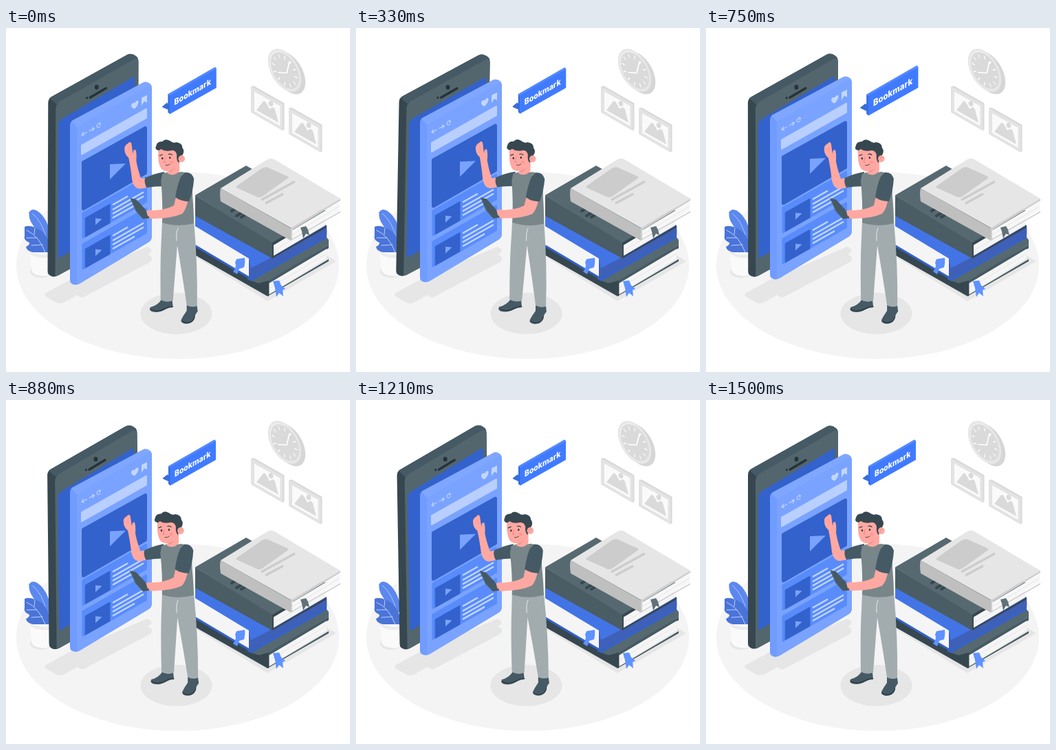
These frames come from a looping animation (500x500 px, 1.54 s). An HTML page with a canvas:

```html
<!DOCTYPE html>
<html lang="en">
<head>
<meta charset="utf-8">
<title>Bookmark</title>
<style>
html, body { margin: 0; width: 100%; height: 100%; overflow: hidden; background: #fff; }
canvas { display: block; width: 500px; height: 500px; }
</style>
</head>
<body>
<canvas id="stage"></canvas>
<script>
const LOOP = 1540;
const LEAD = 40;
const BLUE = '#407bff', DEEP = '#3362cc', PALE = '#79a3ff', MIST = '#c3d6ff', RIBBON = '#5f92ff';
const INK = '#263238', SLATE = '#37474f', STEEL = '#455a64', SKIN = '#ffa8a2';

const canvas = document.getElementById('stage');
const ctx = canvas.getContext('2d');
const ratio = window.devicePixelRatio || 1;
canvas.width = canvas.height = 500 * ratio;

const fill = (color, d) => {
  ctx.fillStyle = color;
  ctx.fill(new Path2D(d));
};

const stroke = (color, width, d, cap = 'round') => {
  ctx.strokeStyle = color;
  ctx.lineWidth = width;
  ctx.lineCap = cap;
  ctx.lineJoin = 'round';
  ctx.stroke(new Path2D(d));
};

const oval = (color, x, y, rx, ry = rx, turn = 0) => {
  ctx.fillStyle = color;
  ctx.beginPath();
  ctx.ellipse(x, y, rx, ry, turn, 0, Math.PI * 2);
  ctx.fill();
};

const rounded = (color, join, d) => {
  fill(color, d);
  stroke(color, join, d);
};

const group = (transform, draw) => {
  ctx.save();
  transform();
  draw();
  ctx.restore();
};

const rotateAbout = (x, y, angle) => {
  ctx.translate(x, y);
  ctx.rotate(angle);
  ctx.translate(-x, -y);
};

const scaleAbout = (x, y, size) => {
  ctx.translate(x, y);
  ctx.scale(size, size);
  ctx.translate(-x, -y);
};

function drawFloor() {
  oval('#f4f4f4', 249.5, 345, 234.5, 136);
  oval('#e6e6e6', 247.5, 415, 52, 30);
  fill('#e6e6e6', 'M58 385L93 366 205 318Q213 320 211 326L206 329 211 332Q214 337 208 341L113 391Q109 393 104 388L86 398Q79 402 73 399L59 391Q54 388 58 385Z');
  fill('#e6e6e6', 'M276 333L380 397 480 339 465 330Z');
}

function drawClock() {
  const disc = (color, x, y, r) => group(() => ctx.transform(.866, .5, 0, 1, x, y), () => oval(color, 0, 0, r));
  disc('#d6d6d6', 411, 65, 28);
  disc('#e6e6e6', 405, 61.5, 28);
  disc('#f0f0f0', 405, 61.5, 25);
  disc('#dadada', 405.5, 62, 24);
  group(() => ctx.transform(.866, .5, 0, 1, 405, 62), () => {
    for (let i = 0; i < 12; i++) {
      ctx.rotate(Math.PI / 6);
      stroke('#fff', 1.4, 'M0 -21V-17');
    }
  });
  stroke('#fff', 1.7, 'M396 64.5L408 65.5 412 49');
}

function drawPicture(x, y) {
  group(() => ctx.translate(x, y), () => {
    rounded('#d9d9d9', 1, 'M0 0L3 -1 47 24V62L45 63 0 37Z');
    rounded('#e3e3e3', 1, 'M0 0L45 25.5V63L0 37Z');
    fill('#fafafa', 'M4 7L41.500 28V57L4 35.500Z');
    fill('#dadada', 'M7 34L17 21Q19 20 21 23L26 32 30 30Q32 29 34 33L39 52Z');
    oval('#dadada', 28, 24.5, 3.3, 4, -.3);
  });
}

function drawBooks() {
  // Lowest book
  fill(STEEL, 'M275 316L382 365 469 315V320L383 371V387L469 336V339L380 390 275 330Z');
  fill(SLATE, 'M275 318L382 367V390L275 330Z');
  fill('#f5f5f5', 'M382.500 371L466 321V335L382.500 387Z');
  stroke('#e0e0e0', .7, 'M383 378L466 328');
  fill('#566970', 'M350 365L465 303 469 308V315L382 367 367 371Z');
  fill(RIBBON, 'M388 368L397 367 400 374 406 379 402 381 403 390 397 385 393 391 391 378Z');

  // Blue book
  fill('#3f60b8', 'M353 327L465 286Q467 287 466 304L356 368Q351 366 353 327Z');
  fill('#f5f5f5', 'M275 285L353 332V362L275 317Z');
  fill('#4374e6', 'M275 268L387 333 356 349 353 335 275 288Z');
  stroke(DEEP, 3, 'M275 316.500L352 362Q354 367 358 365L465 304', 'butt');
  fill(RIBBON, 'M335 336L347 334Q348 340 346 348L339 350 336 358 330 354Q336 347 333 341Z');

  // Dark book
  fill('#566970', 'M275 243L349 200 467 267 387 313Z');
  fill('#4a5c64', 'M275 243L387 312V335L275 273Z');
  fill(SLATE, 'M387 312L465 267V271L390 315V331L466 287V290L387 335Z');
  fill('#f5f5f5', 'M389 315.500L464 272V287L389 331Z');
  stroke('#e0e0e0', .7, 'M390 323L464 280');
  stroke(SLATE, 4, 'M328 266L338 260M335 273L347 266M342 275L350 270');

  // Light book
  fill('#bfbfbf', 'M312 233Q310 239 312 252L414 309V291Z');
  fill('#e6e6e6', 'M312 233L380 191Q385 188 390 191L486 248 415 291Z');
  fill('#cfcfcf', 'M414 291L486 248V251L417 293V306L486 266V268L414 309Z');
  fill('#f7f7f7', 'M416 294L485 253V265L416 306Z');
  stroke('#dedede', .7, 'M417 300L485 259');
  rounded('#cccccc', 3, 'M336 231L373 205Q376 203 380 204L409 217 371 244Q369 245 365 244Z');
  stroke('#cccccc', 3.2, 'M371 250L420 223M377 255L403 241', 'butt');
  fill('#607177', 'M428 290L436 288 439 293 441 301 436 299 432 306 430 296Z');
}

function drawPlant() {
  oval('#e6e6e6', 51, 354, 16, 9);
  fill('#fafafa', 'M34 324H72V352Q64 363 50 360Q37 358 37 350Z');
  fill('#ececec', 'M34 324Q48 333 72 328V332Q48 338 35 328Z');
  rounded('#5c88ee', 1, 'M34 268Q37 262 45 266Q60 275 66 306L54 312Q48 300 40 287Q33 278 34 268Z');
  stroke('#b9ccff', .9, 'M39 270Q53 282 59 307');
  fill('#4a74d8', 'M27 289Q33 286 42 290Q62 296 66 326H39Q30 324 29 318Q35 315 34 312Q25 308 27 302Z');
  stroke('#c9d8ff', .9, 'M30 294Q48 302 57 326M41 300L42 291M30 305L45 305M37 316L53 315');
}

function drawPhone() {
  fill(SLATE, 'M61 109Q61 103 66 100L175 39Q182 35 190 42Q192 44 192 49V290Q192 296 187 299L76 360Q68 364 62 358Q61 356 61 353Z');
  fill(STEEL, 'M63 102L175 39Q182 35 190 42L191 45 73 111Z');
  fill('#53666e', 'M72 361V118Q72 111 78 107L184 46Q192 42 192 50V290Q192 296 187 299L76 360Z');
  fill(DEEP, 'M76 141Q76 136 80 133L183 72Q187 69 187 74V264Q187 270 183 273L80 333Q76 335 76 331Z');
  stroke(INK, 3.4, 'M122 101L145 87.500');
  oval(INK, 131.5, 86, 3, 3.4);
  oval(INK, 117.3, 101.5, 1.5, 1.8);
}

function drawCard(y) {
  group(() => ctx.translate(0, y), () => {
    rounded('#598cfa', 3, 'M112 270L203.500 218V253L112 305Z');
    rounded(DEEP, 1, 'M115.500 276.500L151 256.500V284L115.500 304Z');
    fill(PALE, 'M130 277L139.500 278 130 287Z');
    stroke(MIST, 2.3, 'M155 257.500L177 245M155 264.500L200 239M155 270.500L200 245M155 276.500L187 258.500', 'butt');
  });
}

function drawPanel() {
  fill('#709cff', 'M93 142Q93 137 97 134.500L199 80Q204 77 210 82Q212 84 212 88V303Q212 309 207 312L107 372Q100 376 94 371Q93 369 93 366Z');
  fill('#7fa7ff', 'M95 136L199 80Q204 77 210 82L211 85 104 146Z');
  fill(PALE, 'M103 373.500V151Q103 145 108 142L206 85Q212 82 212 89V303Q212 309 207 312L107 372Z');
  stroke(MIST, 1.1, 'M117.500 152L110 156M112.500 152L110 156 113.500 157M121 150L128.500 146M125 145.500L128.500 146 126 150M137 139.500Q133 139 132 143Q133 147 137 143.500M135.500 138L137.500 139.500 136 141.500');
  fill(MIST, 'M187 118Q182 117 182 113Q183 108 187 109.500Q190 104 192.500 107Q193 112 187 118Z');
  fill(MIST, 'M197 102L205 98V109L201 107 197 113.500Z');
  rounded('#b9cfff', 2, 'M110 171L204 118V131L110 184Z');
  rounded(DEEP, 5, 'M112.500 196L202.500 146V211L112.500 263Z');
  fill(PALE, 'M151 198.500L174 197.500 151 220.500Z');
  drawCard(0);
  drawCard(45);
}

function drawMan() {
  // Shoes and trousers
  fill(STEEL, 'M226 395Q234 399 242 396L243 406Q237 406 232 409Q222 415 212 412Q208 410 210 406Q221 403 226 395Z');
  stroke(INK, 1, 'M210 409Q220 414 231 408Q236 405 243 405');
  fill(STEEL, 'M263 403L278 404 279 412Q275 416 274 423Q271 430 262 430Q254 429 255 424Q258 418 263 411Z');
  stroke(INK, 1, 'M255.500 426Q263 431 271 426Q275 422 274.500 419');
  fill('#a2acaf', 'M227 280H273Q279 345 278 404Q270 407 263 403Q257 362 249 316L243 396Q234 400 225 395Q224 340 226 305Z');
  stroke('#f0f0f0', .9, 'M250 291Q247 297 248 309');

  // Raised arm
  fill(SKIN, 'M204 218L196 219Q191 205 189 193Q190 183 188 177L185 178 184 183 182 168Q180 164 177 168Q171 171 172 177Q172 184 178 189Q181 203 183 221Q185 233 194 234L205 232Z');
  stroke('#f28f8f', .6, 'M178 173L179 179');
  fill(STEEL, 'M230 209Q214 212 202 218Q200 224 204 232Q216 230 230 230Z');

  // Torso
  fill('#78868a', 'M227 212L239 208Q246 211 255 209L268 212Q271 225 271 245Q273 267 273 284Q251 290 227 283Q228 251 225 222Z');
  fill(SKIN, 'M236 198L252 194V208Q244 217 234 211L236 208Z');
  fill('#f28f8f', 'M236 206Q243 204 247 198Q246 208 237 210Z');

  // Lowered arm and tablet
  fill(SKIN, 'M247 245L265 248Q262 264 256 270Q240 277 216 277Q207 279 205 272Q207 265 216 265Q233 264 244 258Z');
  fill(STEEL, 'M260 210Q270 209 273 219Q272 237 266 252Q254 252 246 246Q249 227 254 216Z');
  rounded(STEEL, 1, 'M181 248L189 250 202 264 208 276 199 277 189 266Z');
  stroke('#617179', .8, 'M181 248L189 266 199 277');
  fill(SKIN, 'M204 266Q209 263 216 266L213 270 208 271 206 274Z');

  // Head
  fill(SKIN, 'M221 178Q220 196 225 204Q229 209 237 208Q247 206 252 194L254 177 238 169Z');
  fill(SLATE, 'M222 178Q215 177 218 171Q219 165 227 165Q231 160 238 164Q243 168 247 166Q256 167 256 174Q260 179 256 185Q253 188 251 196Q247 193 248 184Q246 177 240 178Q231 180 225 176Z');
  oval(SKIN, 255, 190, 4.8, 5, .3);
  oval(INK, 227, 189.5, 1.2, 1.6);
  oval(INK, 238, 188.5, 1.2, 1.6);
  stroke(INK, 1.1, 'M223 185.500L227 184M236 183.500Q239 182.500 241 184.500');
  stroke('#e97f80', .9, 'M231 188L229.500 195 232 195.500');
  stroke(INK, .8, 'M232 199.500Q235.500 200.500 238 198');
  oval('#ff928f', 241, 195, 2.4, 1.8);
  stroke('#e97f80', .7, 'M253 191Q254 187 257 188');
}

function drawBubble() {
  fill(DEEP, 'M227.500 114L235 108 236 118Z');
  fill('#366de0', 'M236 96L239 98V124.500L236 122V118L228 114.500 236 109Z');
  fill('#5388ff', 'M236 96L303 57.500 305 59 239 99Z');
  fill(BLUE, 'M238.500 98L305 59V87L238.500 124.500Z');
  group(() => ctx.transform(.866, -.5, 0, 1, 245, 112), () => {
    ctx.fillStyle = '#fff';
    ctx.font = '800 12px Inter, "Open Sans", sans-serif';
    ctx.textBaseline = 'alphabetic';
    ctx.fillText('Bookmark', 0, 0);
  });
}

// Smooth bump that is 0 at both ends and 1 at the peak
function beat(t, start, peak, end) {
  if (t <= start || t >= end) return 0;
  const k = t < peak ? (t - start) / (peak - start) : (end - t) / (end - peak);
  return k * k * (3 - 2 * k);
}

function render(now) {
  const t = now % LOOP;
  const phase = (t + LEAD) / LOOP * Math.PI * 2;
  const sway = Math.sin(phase) * Math.PI / 180;
  const lift = -.4 - 4 * (1 - Math.cos(phase));
  const pulse = 1 + .1 * (beat(t, -50, 130, 370) + beat(t, 570, 720, 880));

  ctx.setTransform(ratio, 0, 0, ratio, 0, 0);
  ctx.fillStyle = '#fff';
  ctx.fillRect(0, 0, 500, 500);

  drawFloor();
  drawClock();
  drawPicture(357, 85.5);
  drawPicture(412, 117);
  drawBooks();
  drawPlant();
  group(() => rotateAbout(127, 198, sway), drawPhone);
  group(() => ctx.translate(0, lift), drawPanel);
  group(() => rotateAbout(246, 292, sway), drawMan);
  group(() => scaleAbout(267, 91, pulse), drawBubble);
}

const begin = performance.now();
function tick() {
  render(performance.now() - begin);
  requestAnimationFrame(tick);
}
tick();
</script>
</body>
</html>
```
